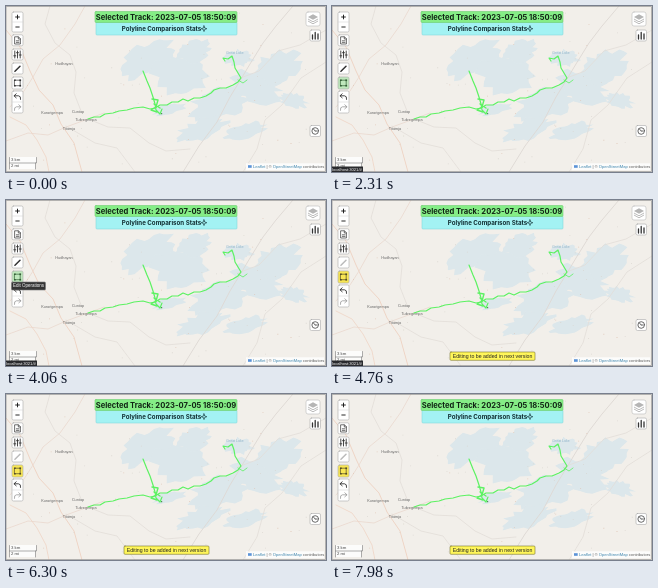
These frames come from a looping animation (320x166 px, 8 s). An HTML page with a canvas:

```html
<!DOCTYPE html>
<html lang="en">
<head>
<meta charset="utf-8">
<title>Track map</title>
<style>
html, body { margin: 0; width: 100%; height: 100%; overflow: hidden; background: #f2efea; }
canvas { display: block; width: 320px; height: 166px; }
</style>
</head>
<body>
<canvas id="stage"></canvas>
<script>
const W = 320, H = 166, LOOP = 8000;
const canvas = document.getElementById('stage');
const ratio = window.devicePixelRatio || 1;
canvas.width = W * ratio;
canvas.height = H * ratio;
let g = canvas.getContext('2d');
g.scale(ratio, ratio);

const SANS = 'Inter, "Open Sans", sans-serif';
const UI = '"Liberation Sans", Arial, sans-serif';

function box(x, y, w, h, fill, stroke, r = 0) {
  g.beginPath();
  g.roundRect(x, y, w, h, r);
  if (fill) { g.fillStyle = fill; g.fill(); }
  if (stroke) { g.strokeStyle = stroke; g.lineWidth = 0.6; g.stroke(); }
}

function label(text, x, y, size, color, align = 'left', weight = 400, family = UI) {
  g.font = `${weight} ${size}px ${family}`;
  g.textAlign = align;
  g.textBaseline = 'middle';
  g.fillStyle = color;
  g.fillText(text, x, y);
}

// Path string helpers keep the map outlines compact.
function line(d, color, width = 0.8) {
  g.strokeStyle = color;
  g.lineWidth = width;
  g.lineJoin = g.lineCap = 'round';
  g.stroke(new Path2D(d));
}

function area(d, color) {
  g.fillStyle = color;
  g.fill(new Path2D(d));
}

function random(seed) {
  return () => (seed = (seed * 16807) % 2147483647) / 2147483647;
}

// Uneven shoreline around an ellipse, tilted by a given angle.
function lake(cx, cy, rx, ry, tilt, seed) {
  const next = random(seed);
  g.save();
  g.translate(cx, cy);
  g.rotate(tilt);
  g.beginPath();
  for (let i = 0; i < 30; i++) {
    const a = i / 30 * Math.PI * 2, k = 0.72 + next() * 0.5;
    g.lineTo(Math.cos(a) * rx * k, Math.sin(a) * ry * k);
  }
  g.fillStyle = '#dce7eb';
  g.fill();
  g.restore();
}

function drawMap() {
  box(0, 0, W, H, '#f2efea');
  lake(142, 52, 29, 15, -0.5, 71);
  lake(176, 69, 29, 20, 0.2, 92);
  lake(188, 45, 18, 11, -0.3, 35);
  lake(214, 97, 30, 15, -0.3, 18);
  lake(250, 80, 26, 15, 0.3, 41);
  lake(273, 61, 22, 16, -0.4, 67);
  lake(233, 52, 14, 8, 0, 83);
  lake(195, 124, 28, 10, -0.4, 29);
  lake(239, 125, 22, 8, -0.2, 51);
  lake(287, 94, 15, 7, 0.3, 17);
  lake(164, 103, 19, 5, -0.2, 23);

  const road = '#efd5c6', lane = '#e3ded9';
  line('M0 24 L14 41 24 65 33 84 47 99 55 118 68 137 76 166', road, 1);
  line('M79 0 L69 18 54 39 37 53 27 71 18 85 4 101', '#ead8cf');
  line('M0 135 L22 127 42 129 60 121 82 113 98 107', '#ead8cf');
  line('M4 111 L20 119 31 134 40 151 43 166', road);
  line('M44 0 L39 18 49 37 64 49 70 66 68 87 75 105', lane);
  line('M287 0 L270 20 257 37 244 58 235 73 224 91 211 116 193 140 177 166', '#ded8d4', 0.9);
  line('M320 56 L295 72 276 99 259 114 251 143 237 166', lane);
  line('M82 113 L102 121 124 122 143 137 160 145 184 143', lane);
  line('M232 73 L253 65 272 45 294 39 320 24', lane);
  line('M60 120 L89 137 111 142 129 166', lane);

  const next = random(437);
  for (let i = 0; i < 70; i++) {
    const x = 20 + next() * 292, y = 6 + next() * 152;
    box(x, y, 0.8, 0.8, i % 3 ? '#d8d4ce' : '#dfc3b2');
  }
  label('Hudhayan', 58, 58, 3.8, '#666', 'center');
  label('Kurangempa', 46, 107, 3.8, '#666', 'center');
  label('Cuntap', 72, 105.5, 3.8, '#666', 'center');
  label('Tukregempa', 80, 114, 3.8, '#666', 'center');
  label('Titamja', 63, 122.5, 3.8, '#666', 'center');
  label('Great Lake', 229, 47.5, 3.5, '#91b4ca', 'center');
}

function drawTrack() {
  const green = '#5cf262';
  line('M82 113 L88 111 94 111 99 108 107 107 113 105 121 104 128 102 137 101 ' +
    '144 103 149 102 154 99 161 99 166 96 172 96 177 93 182 95 188 92 194 92 ' +
    '200 90 205 87 208 84 214 82 220 82 227 79 232 76 235 72 232 67 229 62 ' +
    '228 56 226 50 222 53 217 52 219 55', green, 1.2);
  line('M137 65 L139 70 141 75 144 82 147 91 149 98 150 104 154 108 156 103', green, 1.2);
  line('M146 93 L152 94 150 101 145 104 151 106 M148 98 L154 102', green, 1.4);
  line('M232 74 L237 77 241 74', green, 0.8);
  box(155, 107, 1.2, 1.2, '#4f8d59');
}

function button(y, h = 11, fill = '#fff') {
  box(6, y, 11, h, fill, '#aaa', 1.5);
}

function drawTools(hover, active) {
  const ink = '#333', dim = active ? '#bbb' : ink;
  button(6, 20);
  line('M6 16 H17', '#ccc', 0.5);
  line('M9.6 11 H13.4 M11.5 9.1 V12.9 M9.8 21 H13.2', '#111', 0.9);

  button(28.8);
  line('M9 30.8 H12.5 L14.4 32.7 V38 H9 Z M12.3 31 V33 H14.3 M10.3 34.8 H13 M10.3 36.4 H13', ink, 0.7);

  button(43);
  line('M8.8 45 V52 M11.5 45 V52 M14.2 45 V52 M7.8 49.8 H9.8 M10.5 46.7 H12.5 M13.2 49 H15.2', ink, 0.9);

  button(57);
  line('M9.2 65 L14 60.2', dim, 1.5);
  line('M8.5 65.8 L9.4 64.8', dim, 0.8);

  button(71, 12, active ? '#f8e654' : hover ? '#bfe8bd' : '#fff');
  const mark = active ? '#514b27' : hover ? '#335f36' : ink;
  line('M8.8 74.2 H14.2 V79.7 H8.8 Z', mark, 0.7);
  for (const x of [8, 13.4])
    for (const y of [73.4, 78.9]) box(x, y, 1.7, 1.7, mark);

  button(85, 22);
  line('M6 96 H17', '#ccc', 0.5);
  line('M10.2 87.8 L8 89.8 10.2 91.8 M8.2 89.8 H12.5 Q15 89.8 14.6 93.4', ink, 0.9);
  line('M12.8 98.8 L15 100.8 12.8 102.8 M14.8 100.8 H10.5 Q8 100.8 8.4 104.4', '#999', 0.8);
}

function drawPanels() {
  box(90, 16, 141, 13, '#a3f2f3', '#83d9dc', 1);
  box(89, 5.5, 142, 11, '#85ed86', '#70ce72', 1);
  label('Selected Track: 2023-07-05 18:50:09', 160, 11.3, 7.6, '#102414', 'center', 700, SANS);
  label('Polyline Comparison Stats', 155.5, 22.7, 6.2, '#102d31', 'center', 700, SANS);
  line('M198 19.9 L198.7 22 200.8 22.7 198.7 23.4 198 25.5 197.3 23.4 195.2 22.7 197.3 22 Z', '#183b40', 0.7);

  box(300, 6, 14, 14, '#fff', '#bbb', 2);
  area('M307 8.2 L312 11 307 13.8 302 11 Z', '#b5b5b5');
  line('M302.3 13.2 L307 15.8 311.7 13.2 M302.3 15.2 L307 17.8 311.7 15.2', '#aaa', 0.8);

  box(304, 24, 10.5, 11, '#fff', '#aaa', 1.5);
  line('M306.5 33 V29 M309.2 33 V26.5 M312 33 V28', '#333', 1.3);

  box(304, 119.5, 10.5, 11, '#fff', '#aaa', 1.5);
  g.beginPath();
  g.arc(309.2, 125, 3.3, 0, Math.PI * 2);
  g.strokeStyle = '#444';
  g.lineWidth = 0.8;
  g.stroke();
  line('M309.2 125 L307.3 122.9 M309.2 125 H311.2', '#444', 0.8);

  for (const [text, y, w] of [['3 km', 151, 27], ['2 mi', 157, 26]]) {
    box(3.5, y, w, 6, '#fffc');
    label(text, 5, y + 3.2, 4.3, '#444');
  }
  line('M3.5 151.5 V163 M3.5 157 H30.5 V151.5 M29.5 157 V163', '#777', 0.6);

  box(240, 157.2, 78, 7, '#fffc');
  box(242, 159.2, 3.7, 2.6, '#5b93d7');
  let x = 247;
  for (const [text, color] of [
    ['Leaflet', '#3982ac'], [' | © ', '#555'],
    ['OpenStreetMap', '#3982ac'], [' contributors', '#555']
  ]) {
    label(text, x, 160.7, 4.1, color);
    x += g.measureText(text).width;
  }
}

function drawPointer(t) {
  if (t < 910 || t >= 1750) return;
  const p = Math.max(0, (t - 1050) / 700);
  const x = 26 - 14 * p, y = 79 - p;
  line(`M${x - 1.5} ${y} h3 M${x} ${y - 1.5} v3`, '#555', 0.7);
}

function drawMessages(t) {
  if (t >= 1750 && t < 5530) {
    g.globalAlpha = t < 5180 ? 1 : Math.max(0, 1 - (t - 5180) / 350);
    box(0, 160.5, 31, 5.5, '#292a2d');
    label('localhost:3021/#', 0, 163.5, 4.1, '#fff');
    g.globalAlpha = 1;
  }
  if (t >= 2660 && t < 4550) {
    box(5.5, 82, 34, 8, '#343434', '#777', 1);
    label('Edit Operations', 22.5, 86.2, 4.5, '#fff', 'center');
  }
  if (t >= 4760) {
    box(118, 152, 85, 8.3, '#fff65a', '#77722d', 1);
    label('Editing to be added in next version', 160.5, 156.4, 5.2, '#222', 'center');
  }
}

// The map never changes, so it is painted once.
const screen = g;
const mapLayer = document.createElement('canvas');
mapLayer.width = canvas.width;
mapLayer.height = canvas.height;
g = mapLayer.getContext('2d');
g.scale(ratio, ratio);
drawMap();
drawTrack();
g = screen;

function render(now) {
  const t = now % LOOP;
  g.drawImage(mapLayer, 0, 0, W, H);
  drawPanels();
  drawTools(t >= 1750, t >= 4760);
  drawPointer(t);
  box(0.5, 0.5, W - 1, H - 1, null, '#888');
  drawMessages(t);
}

const start = performance.now();
function tick() {
  render(performance.now() - start);
  requestAnimationFrame(tick);
}
tick();
</script>
</body>
</html>
```
